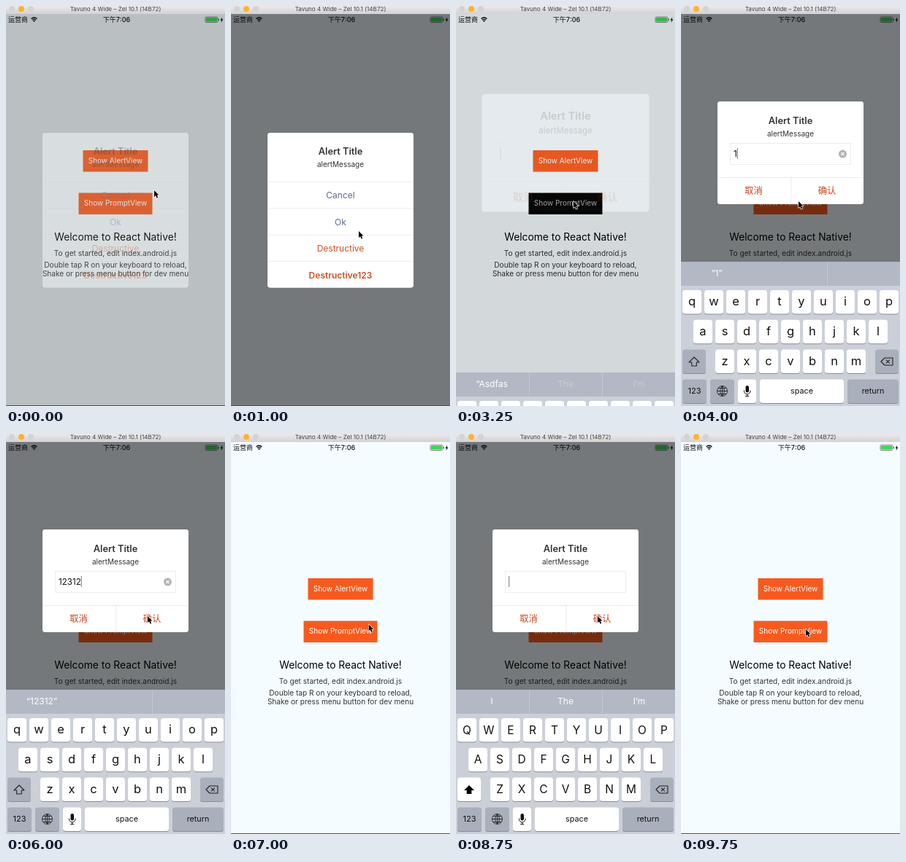
An HTML page with a canvas for the animation above (10 s loop, 300 px wide and 549 px high).

```html
<!DOCTYPE html>
<html lang="en">
<head>
<meta charset="utf-8">
<title>Alert and prompt demo</title>
<style>
  html, body { margin: 0; width: 100%; height: 100%; overflow: hidden; background: #f5fcff; }
  canvas { display: block; }
</style>
</head>
<body>
<canvas id="stage" width="300" height="549"></canvas>
<script>
const ctx = document.getElementById('stage').getContext('2d');
const LOOP = 10000, STEP = 250, RISE = 350, FALL = 500, TRAVEL = 750, PRESS = 160;
const DIM = 0.52, KEYBOARD_HEIGHT = 198;
const ORANGE = '#f75a1e', LINE = 'rgba(0,0,0,.1)', INK = '#333', GREY_KEY = '#a9b0bb';

// [open, close] times; the first alert is already closing when the loop starts
const ALERTS = [[-1000, -265], [620, 1830]];
const PROMPTS = [[3155, 6250], [7477, 8750]];
const TYPING = { start: 4000, end: 6750, text: '12312' };

// [arrival time, x, y] of each place the pointer visits
const STOPS = [[0, 203, 253], [500, 179, 212], [1000, 175, 309], [1750, 172, 331], [2750, 161, 268],
  [6000, 194, 250], [7250, 186, 267], [8500, 194, 250], [9750, 171, 268]];

const clamp = v => Math.min(1, Math.max(0, v));

function presence(t, shows) {
  const show = shows.find(([open, close]) => t >= open && t < close + FALL);
  if (!show) return { amount: 0, rising: false };
  const [open, close] = show, rising = t < open + RISE;
  return { rising, amount: rising ? (t - open) / RISE : 1 - clamp((t - close) / FALL) };
}

const isPressed = (t, shows) => shows.some(([open]) => Math.abs(t - open) < PRESS);

function pointerAt(t) {
  const i = STOPS.findLastIndex(([time]) => time <= t);
  const [left, x, y] = STOPS[i];
  const [arrive, nextX, nextY] = STOPS[i + 1] || [LOOP, x, y];
  const start = Math.max(left, arrive - TRAVEL);
  const p = clamp((t - start) / (arrive - start));
  return [x + (nextX - x) * p, y + (nextY - y) * p];
}

function text(str, x, y, size, color, weight = 400, align = 'center') {
  ctx.font = `${weight} ${size}px Inter, "Noto Sans CJK SC", "Noto Sans CJK", sans-serif`;
  ctx.textAlign = align;
  ctx.fillStyle = color;
  ctx.fillText(str, x, y + size * .36);
}

function box(x, y, w, h, color, radius = 0) {
  ctx.beginPath();
  ctx.roundRect(x, y, w, h, radius);
  ctx.fillStyle = color;
  ctx.fill();
}

function shape(path, x, y, fill, stroke, width = 1) {
  const p = new Path2D(path);
  ctx.save();
  ctx.translate(x, y);
  ctx.lineWidth = width;
  ctx.lineJoin = 'round';
  if (stroke) { ctx.strokeStyle = stroke; ctx.stroke(p); }
  if (fill) { ctx.fillStyle = fill; ctx.fill(p); }
  ctx.restore();
}

function button(label, y, w, pressed) {
  box(150 - w / 2, y, w, 29.5, pressed ? '#000' : ORANGE);
  text(label, 150, y + 14, 10, pressed ? '#aaa' : '#fff');
}

function statusBar() {
  text('运营商', 3, 19, 9, '#111', 400, 'left');
  shape('M-4-1.5Q0-5 4-1.5M-2.6.3Q0-2 2.6.3', 38.5, 19, null, '#111', 1.3);
  shape('M-1.5 1.2Q0 0 1.5 1.2L0 3Z', 38.5, 19, '#111');
  text('下午7:06', 151.5, 19, 9, '#111', 500);
  ctx.lineWidth = .7;
  ctx.strokeStyle = '#555';
  ctx.beginPath();
  ctx.roundRect(273, 15, 17, 7.5, 1.5);
  ctx.stroke();
  box(274, 16, 15, 5.5, '#43d35c', 1);
  box(290.8, 17.3, 1, 3, '#555');
  shape('M1-4L-2 .6H-.2L-1 4L2-.8H.2Z', 295.5, 19, '#111');
}

function app(t) {
  box(0, 11, 300, 538, '#f5fcff');
  statusBar();
  button('Show AlertView', 198, 89, isPressed(t, ALERTS));
  button('Show PromptView', 256.5, 101, isPressed(t, PROMPTS));
  text('Welcome to React Native!', 150, 317, 13.8, '#000');
  text('To get started, edit index.android.js', 150, 339, 10.1, INK);
  text('Double tap R on your keyboard to reload,', 150, 355, 10.1, INK);
  text('Shake or press menu button for dev menu', 150, 367, 10.1, INK);
}

function titleBar() {
  const shade = ctx.createLinearGradient(0, 0, 0, 11);
  shade.addColorStop(0, '#ebe9eb');
  shade.addColorStop(1, '#d3d1d3');
  box(0, 0, 300, 11, shade);
  ['#d4d2d4', '#fdb32e', '#d4d2d4'].forEach((color, i) => box(4 + 13 * i, 0, 8, 8, color, 4));
  text('Tavuno 4 Wide – Zel 10.1 (14B72)', 150, 4.5, 8.1, '#444');
}

// Dims the screen around a panel, then draws the panel and its content
function dialog({ amount, rising }, top, height, content) {
  if (!amount) return;
  const scale = rising ? 1 + .2 * (1 - amount) : 1;
  const w = 200 * scale, h = height * scale, middle = top + height / 2;
  const left = 150 - w / 2, y = middle - h / 2;

  ctx.beginPath();
  ctx.rect(0, 11, 300, 538);
  ctx.roundRect(left, y, w, h, 4);
  ctx.fillStyle = `rgba(0,0,0,${DIM * amount})`;
  ctx.fill('evenodd');

  const grey = 255 * amount, alpha = amount < 1 ? .7 * amount ** 1.5 : 1;
  box(left, y, w, h, `rgba(${grey},${grey},${grey},${alpha})`, 4);

  ctx.save();
  ctx.globalAlpha = amount ** 1.4;
  ctx.translate(150, middle);
  ctx.scale(scale, scale);
  ctx.translate(-150, -middle);
  content();
  ctx.restore();
}

function heading(y) {
  text('Alert Title', 150, y, 12.8, INK, 600);
  text('alertMessage', 150, y + 18, 10, INK);
}

function alertContent() {
  heading(199.5);
  ['Cancel', 'Ok', 'Destructive', 'Destructive123'].forEach((label, i) => {
    const y = 241 + 36.4 * i;
    box(50, y, 200, .8, LINE);
    text(label, 150, y + 19, 12, i < 2 ? '#5b6a8c' : '#d04e22', i < 3 ? 400 : 600);
  });
}

function promptContent(value) {
  heading(157);
  ctx.lineWidth = .7;
  ctx.strokeStyle = LINE;
  ctx.strokeRect(67.5, 188.5, 165, 29);
  text(value, 72, 203, 11.6, '#111', 400, 'left');
  box(72 + ctx.measureText(value).width, 195, 1.2, 15, '#8a8a96');
  if (value) {
    box(216, 197.5, 11, 11, '#b4b4b8', 5.5);
    shape('M-2-2L2 2M2-2L-2 2', 221.5, 203, null, '#fff', 1.1);
  }
  box(50, 235, 200, .8, LINE);
  box(150.5, 235, .8, 37, LINE);
  text('取消', 99.5, 254, 12.3, '#c8431a');
  text('确认', 200, 254, 12.3, '#c8431a');
}

function key(x, y, w, color = '#fff') {
  box(x, y + 1, w, 32.5, '#888c94', 3.5);
  box(x, y, w, 32.5, color, 3.5);
}

// While rising, the bar still shows the previous word and fades in the rest
function suggestionBar(t, value, { amount, rising }) {
  const previous = t < TYPING.start ? '“Asdfas' : '“1';
  const words = value ? [`“${value}”`, '', ''] : [rising ? previous : 'I', 'The', 'I’m'];
  box(0, 351, 300, 33, '#b2b9c4');
  words.forEach((word, i) => {
    if (i === 2 || (i && !value)) box(100 * i, 351, .8, 33, '#c6ccd5');
    ctx.globalAlpha = i && rising ? amount : 1;
    text(word, 49 + 101 * i, 366.5, 12, '#fff');
    ctx.globalAlpha = 1;
  });
}

function keyboard(t, value, state) {
  if (!state.amount) return;
  const caps = !value;
  const eased = state.amount - .04 * Math.sin(2 * Math.PI * state.amount);
  ctx.save();
  ctx.translate(0, KEYBOARD_HEIGHT * (1 - eased));
  box(0, 351, 300, KEYBOARD_HEIGHT, '#cbd0d8');
  suggestionBar(t, value, state);

  ['qwertyuiop', 'asdfghjkl', 'zxcvbnm'].forEach((row, r) => {
    [...row].forEach((letter, i) => {
      const x = 165 - 15 * row.length + 30 * i, y = 390 + 40.8 * r;
      key(x - 13, y, 26);
      text(caps ? letter.toUpperCase() : letter, x, y + (caps ? 16 : 15), caps ? 15.5 : 16.5, '#111');
    });
  });

  key(2, 471.6, 32, caps ? '#fff' : GREY_KEY);
  shape('M0-6L7 1H3.3V6H-3.3V1H-7Z', 18, 488, caps ? '#000' : null, caps ? null : '#222', 1.1);
  key(266, 471.6, 32, GREY_KEY);
  shape('M-8 0L-3-5H8V5H-3ZM-1-2.3L4 2.3M4-2.3L-1 2.3', 282, 488, null, '#222', 1.1);

  key(2, 512.4, 33, GREY_KEY);
  text('123', 18.5, 528.5, 11, '#111');
  key(40, 512.4, 33, GREY_KEY);
  shape('M-7 0A7 7 0 1 1 7 0A7 7 0 1 1-7 0ZM-7 0H7M0-7V7M-5.6-4H5.6M-5.6 4H5.6M0-7Q-6 0 0 7M0-7Q6 0 0 7',
    56.5, 528.5, null, '#222', .9);
  key(78, 512.4, 25);
  box(88.5, 521, 4.5, 9.5, '#111', 2.2);
  shape('M-4.3-1V0A4.3 4.3 0 0 0 4.3 0V-1M0 4.5V7M-2.5 7H2.5', 90.7, 528.5, null, '#111', 1);
  key(108, 512.4, 115);
  text('space', 165.5, 528, 10.8, '#111');
  key(228, 512.4, 70, GREY_KEY);
  text('return', 263, 528, 10.8, '#111');
  ctx.restore();
}

function draw(t) {
  const typed = t >= TYPING.start && t < TYPING.end ? (t - TYPING.start) / STEP + 1 : 0;
  const value = TYPING.text.slice(0, typed);
  const prompt = presence(t, PROMPTS);
  app(t);
  dialog(presence(t, ALERTS), 174, 212.5, alertContent);
  dialog(prompt, 131, 141, () => promptContent(value));
  box(0, 548, 300, 1, '#5d4a56');
  keyboard(t, value, prompt);
  titleBar();
  shape('M0 0V9L2.1 7.2L3.6 10.6L5.2 9.9L3.8 6.6H6.5Z', ...pointerAt(t), '#000', '#fff', 1.4);
}

function tick() {
  draw(Math.floor(performance.now() % LOOP / STEP) * STEP);
  requestAnimationFrame(tick);
}
tick();
</script>
</body>
</html>
```
